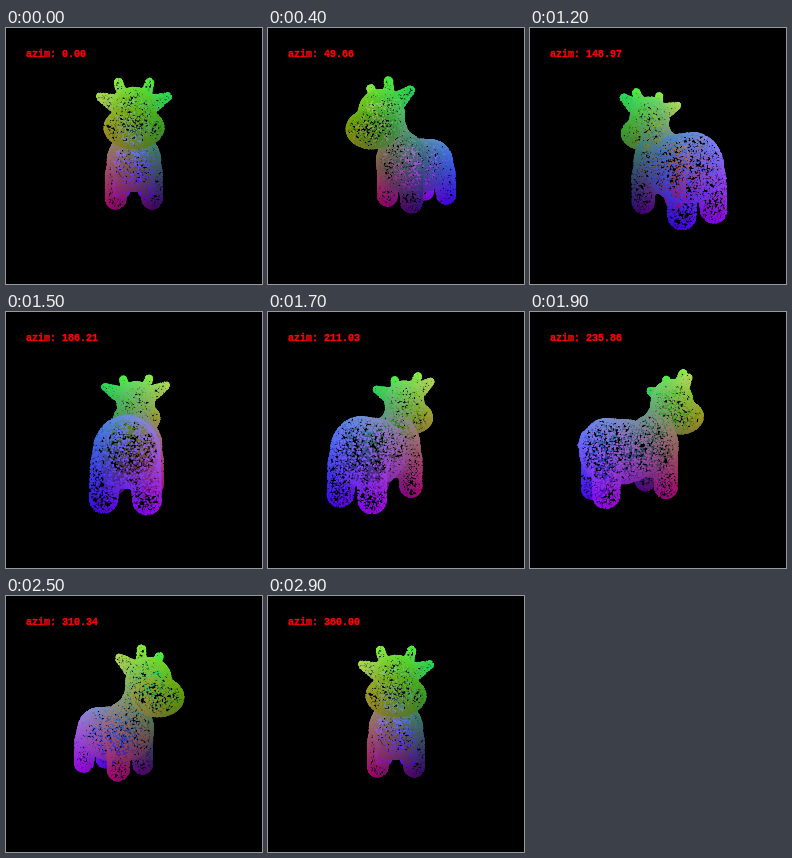
Recreate the animation shown at these times as an HTML page with a canvas. Size 256 px wide and 256 px high, loop 3000 ms.

```html
<!DOCTYPE html>
<html lang="en">
<head>
<meta charset="utf-8">
<title>Rotating point cloud</title>
<style>
  html, body { margin: 0; width: 100%; height: 100%; overflow: hidden; background: #000; }
  canvas, svg { position: absolute; left: 0; top: 0; width: 256px; height: 256px; }
  text {
    font: bold 10px "Liberation Mono", "Courier New", monospace;
    fill: #f00; stroke: #f00; stroke-width: 0.35px; white-space: pre;
  }
</style>
</head>
<body>
<canvas id="view" width="256" height="256"></canvas>
<svg viewBox="0 0 256 256"><text id="label" x="20" y="29">azim: 0.00</text></svg>
<script>
const SIZE = 256, FRAMES = 30, FRAME_MS = 100;
const COUNT = 10000, DOT = 1.28, DISTANCE = 3;
const FOCAL = SIZE / 2 / Math.tan(Math.PI / 6);
const LOW = -0.737, RANGE = 1.79;

// Body parts, mirrored in x: y is up, the nose points to -z.
const ellipsoid = (c, r) => p => {
  let a = 0, b = 0;
  for (let i = 0; i < 3; i++) {
    const q = (p[i] - c[i]) / r[i];
    a += q * q;
    b += (q / r[i]) ** 2;
  }
  a = Math.sqrt(a);
  return a * (a - 1) / (Math.sqrt(b) + 1e-6);
};

const cone = (a, ra, b, rb) => {
  const d = b.map((v, i) => v - a[i]);
  const len = d[0] * d[0] + d[1] * d[1] + d[2] * d[2];
  return p => {
    const x = p[0] - a[0], y = p[1] - a[1], z = p[2] - a[2];
    const t = Math.min(1, Math.max(0, (x * d[0] + y * d[1] + z * d[2]) / len));
    return Math.hypot(x - d[0] * t, y - d[1] * t, z - d[2] * t) - ra - (rb - ra) * t;
  };
};

const parts = [
  ellipsoid([0, 0.54, -0.24], [0.28, 0.31, 0.31]),          // skull
  ellipsoid([0, 0.33, -0.39], [0.36, 0.25, 0.31]),          // muzzle
  cone([0.27, 0.68, -0.18], 0.11, [0.43, 0.76, -0.15], 0.06), // ear
  cone([0.15, 0.76, -0.24], 0.07, [0.19, 0.90, -0.28], 0.06), // horn
  cone([0, 0.10, 0.05], 0.22, [0, 0.40, -0.10], 0.20),      // neck
  ellipsoid([0, -0.08, 0.10], [0.38, 0.42, 0.34]),          // chest
  ellipsoid([0, -0.14, 0.50], [0.36, 0.40, 0.45]),          // belly
  ellipsoid([0, -0.12, 0.72], [0.35, 0.38, 0.31]),          // rump
  cone([0.24, -0.25, 0.05], 0.16, [0.25, -0.585, 0.05], 0.15), // front leg
  cone([0.20, -0.25, 0.80], 0.16, [0.215, -0.585, 0.81], 0.15), // hind leg
  cone([0, 0.05, 0.97], 0.05, [0, -0.06, 1.03], 0.03)       // tail
];

function field(x, y, z) {
  const p = [Math.abs(x), y, z], k = 0.05;
  let d = 9;
  for (const part of parts) {
    const e = part(p), h = Math.max(k - Math.abs(d - e), 0);
    d = Math.min(d, e) - h * h / (4 * k);
  }
  return d + 0.012;
}

let seed = 20;
function random() {
  seed = (seed + 0x6D2B79F5) | 0;
  let t = Math.imul(seed ^ (seed >>> 15), 1 | seed);
  t = (t + Math.imul(t ^ (t >>> 7), 61 | t)) ^ t;
  return ((t ^ (t >>> 14)) >>> 0) / 4294967296;
}

// Scatter: keep random points near the surface, then pull them onto it.
// The thicker shell at the top makes ears and horns denser.
function scatter() {
  const points = [], h = 0.001;
  while (points.length < COUNT) {
    let x = random() * 1.2 - 0.6, y = random() * 1.9 - 0.85, z = random() * 1.95 - 0.8;
    let d = field(x, y, z);
    if (Math.abs(d) > (y > 0.65 ? 0.035 : 0.025)) continue;
    for (let i = 0; i < 2; i++) {
      const gx = (field(x + h, y, z) - d) / h;
      const gy = (field(x, y + h, z) - d) / h;
      const gz = (field(x, y, z + h) - d) / h;
      const s = d / Math.max(gx * gx + gy * gy + gz * gz, 0.2);
      x -= gx * s; y -= gy * s; z -= gz * s;
      d = field(x, y, z);
    }
    const rgb = [x, y, z].map(v => 255 * Math.min(1, Math.max(0, (v - LOW) / RANGE)));
    points.push({ x, y, z, rgb, depth: 0 });
  }
  return points;
}

const points = scatter();
const ctx = document.getElementById("view").getContext("2d");
const label = document.getElementById("label");
const image = ctx.createImageData(SIZE, SIZE);
const light = new Float32Array(SIZE * SIZE * 4);

// Soft dot: opaque in the middle, clear at the rim.
function dot(u, v, rgb) {
  const col = Math.floor(u), row = Math.floor(v);
  for (let j = row - 1; j <= row + 1; j++) {
    for (let i = col - 1; i <= col + 1; i++) {
      const w = 1 - ((i + 0.5 - u) ** 2 + (j + 0.5 - v) ** 2) / (DOT * DOT);
      if (w <= 0) continue;
      const at = (j * SIZE + i) * 4;
      for (let k = 0; k < 3; k++) light[at + k] += (rgb[k] - light[at + k]) * w;
    }
  }
}

function draw(azim) {
  const a = azim * Math.PI / 180, c = Math.cos(a), s = Math.sin(a);
  for (const p of points) p.depth = DISTANCE + p.x * s + p.z * c;
  points.sort((p, q) => q.depth - p.depth);
  light.fill(0);
  for (const p of points) {
    const scale = FOCAL / p.depth;
    dot(SIZE / 2 + (p.z * s - p.x * c) * scale, SIZE / 2 - p.y * scale, p.rgb);
  }
  image.data.set(light);
  for (let i = 3; i < light.length; i += 4) image.data[i] = 255;
  ctx.putImageData(image, 0, 0);
  label.textContent = "azim: " + azim.toFixed(2);
}

let shown = -1;
function tick() {
  const step = Math.floor(performance.now() / FRAME_MS) % FRAMES;
  if (step !== shown) {
    shown = step;
    draw(360 * step / (FRAMES - 1));
  }
  requestAnimationFrame(tick);
}
tick();
</script>
</body>
</html>
```
